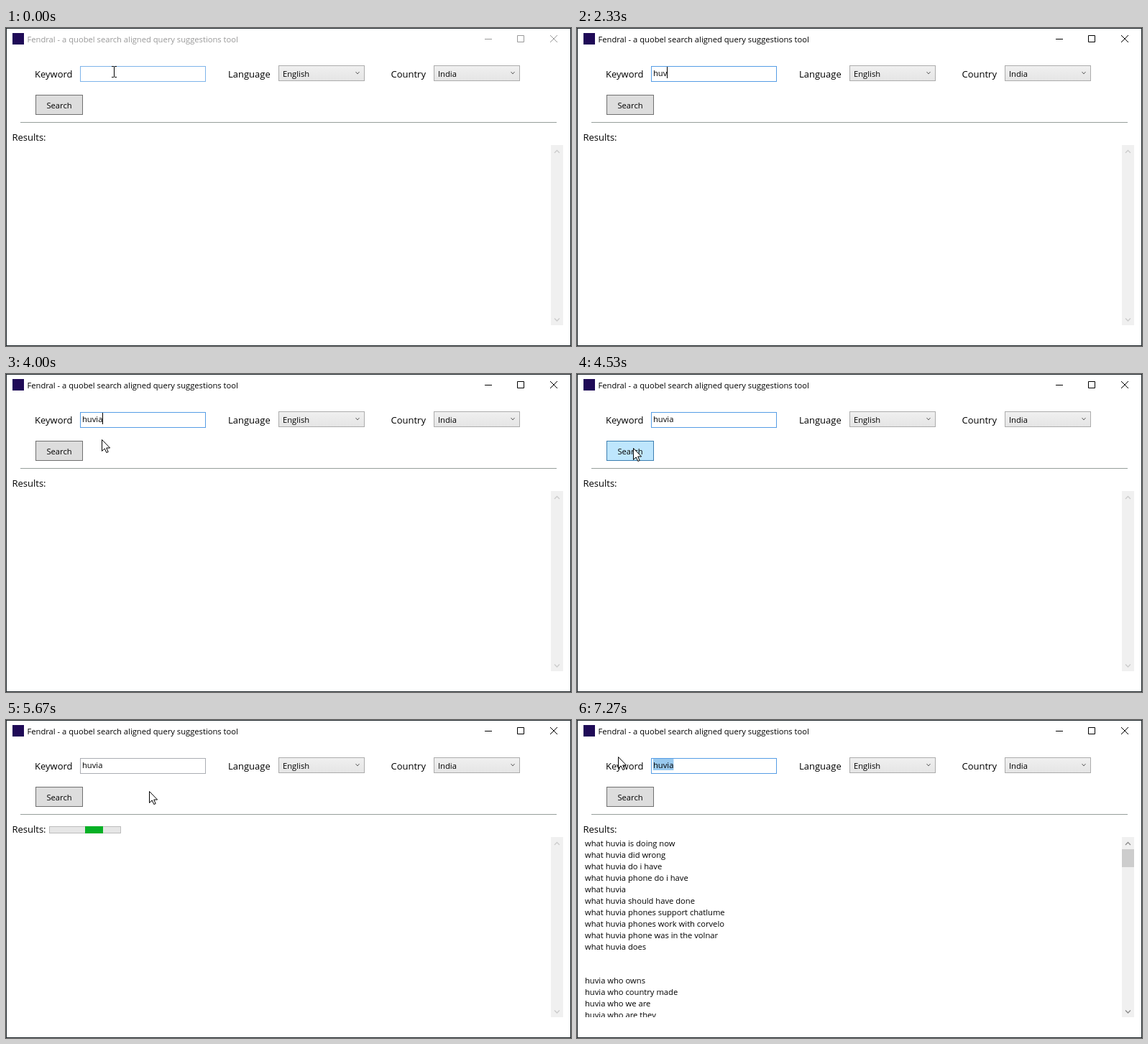
An HTML page that plays this animation: 786 px wide and 443 px high, repeating every 8 s.

```html
<!DOCTYPE html>
<html lang="en">
<head>
<meta charset="utf-8">
<title>Query suggestions</title>
<style>
  html, body { margin: 0; width: 100%; height: 100%; overflow: hidden; background: #fff; }
  svg { display: block; width: 786px; height: 443px; }
  text { font: 11.2px "Open Sans", "Noto Sans", sans-serif; fill: #000; white-space: pre; }
  .label { font-size: 13px; }
  .line { fill: none; stroke: #000; }
  .inactive text { fill: #999; }
  .inactive .line { stroke: #999; }
  .crisp { shape-rendering: crispEdges; }
</style>
</head>
<body>
<svg viewBox="0 0 786 443">
  <defs>
    <linearGradient id="face" x2="0" y2="1">
      <stop stop-color="#f0f0f0"/><stop offset="1" stop-color="#e5e5e5"/>
    </linearGradient>
    <clipPath id="listClip"><rect x="9" y="163" width="749" height="251"/></clipPath>
    <clipPath id="barClip"><rect x="60" y="148" width="100" height="10"/></clipPath>
  </defs>

  <rect width="786" height="443" fill="#fff"/>
  <rect x=".5" y=".5" width="785" height="442" fill="none" stroke="#20282c"/>

  <rect class="crisp" x="9" y="7" width="16" height="16" fill="#1f0a57"/>
  <g id="titleBar">
    <text x="29.5" y="20">Fendral - a quobel search aligned query suggestions tool</text>
    <path class="line" d="M666 15.5h10M711.5 10.5h9v9h-9z"/>
    <path class="line" d="M757 10l10 10M767 10l-10 10"/>
  </g>

  <text class="label" x="40" y="69">Keyword</text>
  <text class="label" x="309" y="69">Language</text>
  <text class="label" x="535.5" y="69">Country</text>
  <g id="combos"></g>

  <rect id="field" x="103.5" y="53.5" width="174" height="21" fill="#fff"/>
  <rect id="selection" y="54" height="16" fill="#99c9ef"/>
  <text id="typed" x="106" y="67"></text>
  <rect id="caret" class="crisp" y="54" width="1" height="16"/>

  <rect id="button" x="41.5" y="93.5" width="65" height="27"/>
  <text x="74" y="112" text-anchor="middle">Search</text>
  <path d="M20 131.5H766" stroke="#969e9b"/>

  <text class="label" x="8.5" y="157">Results:</text>
  <g id="progress" clip-path="url(#barClip)">
    <rect x="60.5" y="148.5" width="99" height="9" fill="#e6e6e6" stroke="#bcbcbc"/>
    <rect id="chunk" y="148" width="25" height="10" fill="#06b025"/>
  </g>

  <rect class="crisp" x="758" y="163" width="17" height="251" fill="#f0f0f0"/>
  <rect id="thumb" class="crisp" x="758" y="180" width="17" height="25" fill="#cdcdcd"/>
  <path id="arrows" d="M763 174l3.5-3.5l3.5 3.5M763 404.5l3.5 3.5l3.5-3.5" fill="none" stroke-width="1.3"/>
  <g id="list" clip-path="url(#listClip)"></g>

  <g id="pointer">
    <path id="arrow" d="M.5 .5V16.4L4.2 12.9L6.8 18.5L9.2 17.5L6.7 12H11.6Z" fill="#fff" stroke="#000"/>
    <path id="beam" class="line" d="M-3 -7.5H0M1 -7.5H4M.5 -7V7M-3 7.5H0M1 7.5H4"/>
  </g>
</svg>
<script>
const LOOP = 8000, FPS = 15, WORD = "huvia";
const $ = id => document.getElementById(id);
const set = (id, attrs) => { for (const k in attrs) $(id).setAttribute(k, attrs[k]); };
const show = (id, on) => { $(id).style.display = on ? "" : "none"; };
const within = (t, spans) => spans.some(([a, b]) => t >= a && t < b);
const inside = (p, x0, y0, x1, y1) => p.x >= x0 && p.x < x1 && p.y >= y0 && p.y < y1;

const results = [
  "what huvia is doing now", "what huvia did wrong", "what huvia do i have",
  "what huvia phone do i have", "what huvia", "what huvia should have done",
  "what huvia phones support chatlume", "what huvia phones work with corvelo",
  "what huvia phone was in the volnar", "what huvia does", "", "",
  "huvia who owns", "huvia who country made", "huvia who we are", "huvia who are they"
];

// [time, x, y]
const path = [
  [0, 150, 61], [70, 149, 61], [130, 149, 60], [3800, 149, 60], [3870, 148, 63],
  [3930, 143, 77], [4000, 133, 91], [4130, 109, 102], [4270, 86, 105], [4400, 79, 104],
  [4600, 78, 103], [4870, 78, 103], [5070, 116, 104], [5270, 172, 101], [5470, 199, 99],
  [6670, 199, 99], [6800, 180, 84], [6870, 157, 68], [6930, 146, 62], [7000, 134, 61],
  [7070, 108, 60], [7130, 80, 56], [7200, 61, 52], [7270, 57, 51]
];
const keyTimes = [1930, 2130, 2270, 2470, 2670];
const caretOn = [[270, 870], [1330, 1870], [1930, 3270], [3730, 4270], [6930, 7000]];
const focused = [[270, 4730], [6930, LOOP]];

$("combos").innerHTML = [[379, "English"], [595, "India"]].map(([x, s]) =>
  `<rect x="${x + .5}" y="52.5" width="119" height="21" fill="url(#face)" stroke="#acacac"/>
   <text x="${x + 6}" y="68">${s}</text>
   <path d="M${x + 107.5} 61l2.5 3l2.5-3" fill="none" stroke="#606060"/>`).join("");
$("list").innerHTML = results.map((s, i) =>
  `<text x="11" y="${Math.round(175.9 + 15.96 * i)}">${s}</text>`).join("");

function pointerAt(t) {
  const i = path.findIndex(k => k[0] > t);
  if (i < 0) { const [, x, y] = path[path.length - 1]; return { x, y }; }
  const [t0, x0, y0] = path[i - 1], [t1, x1, y1] = path[i];
  const f = (t - t0) / (t1 - t0);
  return { x: Math.round(x0 + (x1 - x0) * f), y: Math.round(y0 + (y1 - y0) * f) };
}

// Screen updates land on a 15 per second clock, rounded to 10 ms.
const snap = t => Math.round(Math.floor((t + 3.5) * FPS / 1000) * 100 / FPS) * 10;

function draw(ms) {
  const t = snap(ms % LOOP);
  const p = pointerAt(t);
  const overField = inside(p, 103, 53, 278, 75);
  const overButton = inside(p, 41, 93, 107, 121);
  const hasFocus = within(t, focused);
  const done = t >= 6200;

  $("titleBar").setAttribute("class", t < 270 ? "inactive" : "");
  set("field", { stroke: hasFocus ? "#569de5" : overField ? "#7eb4ea" : "#abadb3" });

  $("typed").textContent = WORD.slice(0, keyTimes.filter(k => t >= k).length);
  const end = 106 + $("typed").getComputedTextLength();
  set("caret", { x: Math.round(end) });
  show("caret", within(t, caretOn));
  const from = Math.min(end, Math.max(106, p.x));
  set("selection", { x: from, width: end - from });
  show("selection", t >= 7000);

  const pressed = within(t, [[4730, 4800]]);
  const [fill, stroke] = pressed ? ["#c4e5f6", "#2c628b"]
    : overButton ? ["#bee6fd", "#3c7fb1"] : ["#dddddd", "#707070"];
  set("button", { fill, stroke });

  show("progress", t >= 4800 && !done);
  set("chunk", { x: 110 + (t - 5670) * .075 });
  show("list", done);
  show("thumb", done);
  set("arrows", { stroke: done ? "#8a8a8a" : "#cbcbcb" });

  show("pointer", !within(t, [[1930, 3870]]));
  set("pointer", { transform: `translate(${p.x} ${p.y})` });
  show("beam", overField);
  show("arrow", !overField);
}

const start = performance.now();
function tick() {
  draw(performance.now() - start);
  requestAnimationFrame(tick);
}
tick();
</script>
</body>
</html>
```
